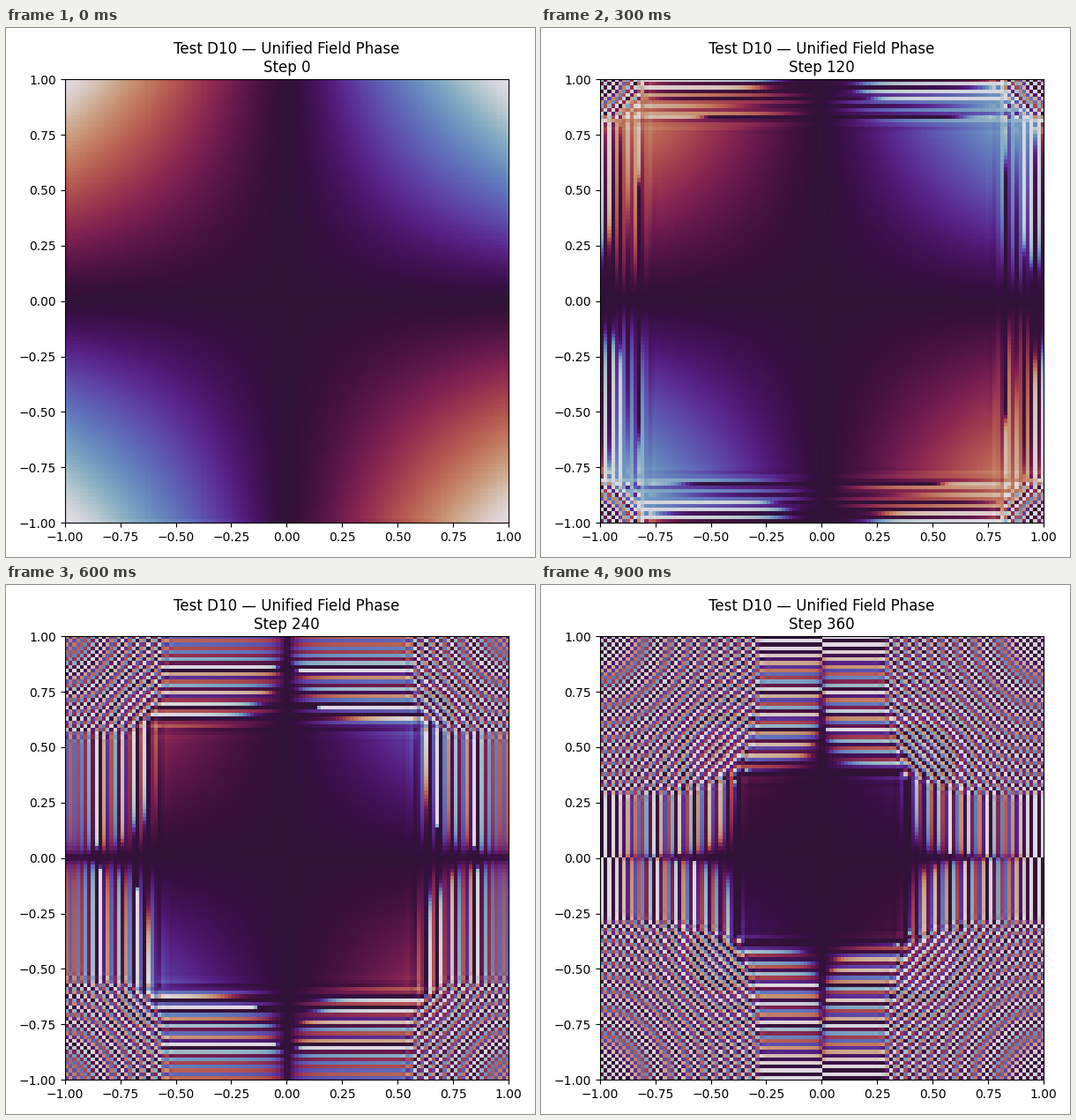
Recreate the animation shown at these times as a matplotlib script. Size 600 px wide and 600 px high, loop 1000 ms.

```python
import numpy as np
import matplotlib.pyplot as plt
from matplotlib.animation import FuncAnimation

SIZE = 120              # grid cells per side
RATE = 0.05             # dt / dx^2 of the explicit scheme
STEPS_PER_FRAME = 40
FRAMES = 10


def laplacian(field):
    """Five-point stencil on a periodic grid."""
    return (np.roll(field, 1, 0) + np.roll(field, -1, 0)
            + np.roll(field, 1, 1) + np.roll(field, -1, 1) - 4 * field)


def simulate():
    """Return the phase of the field at every displayed step."""
    axis = np.linspace(-1, 1, SIZE)
    x, y = np.meshgrid(axis, axis)
    psi = np.exp(1j * np.pi * x * y)
    phases = []
    for step in range(STEPS_PER_FRAME * (FRAMES - 1) + 1):
        psi = psi + 1j * RATE * laplacian(psi)
        if step % STEPS_PER_FRAME == 0:
            phases.append(np.angle(psi))
    return phases


def title_text(frame):
    return f"Test D10 — Unified Field Phase\nStep {frame * STEPS_PER_FRAME}"


phases = simulate()

plt.rcParams["font.family"] = "DejaVu Sans"
fig, ax = plt.subplots(figsize=(6, 6), dpi=100)
image = ax.imshow(phases[0], cmap="twilight", vmin=-np.pi, vmax=np.pi,
                  extent=(-1, 1, -1, 1), interpolation="nearest")
title = ax.set_title(title_text(0))
fig.tight_layout()


def update(frame):
    image.set_data(phases[frame])
    title.set_text(title_text(frame))
    return image, title


anim = FuncAnimation(fig, update, frames=FRAMES, interval=100,
                     repeat=True, repeat_delay=0, blit=False)
plt.show()
```
